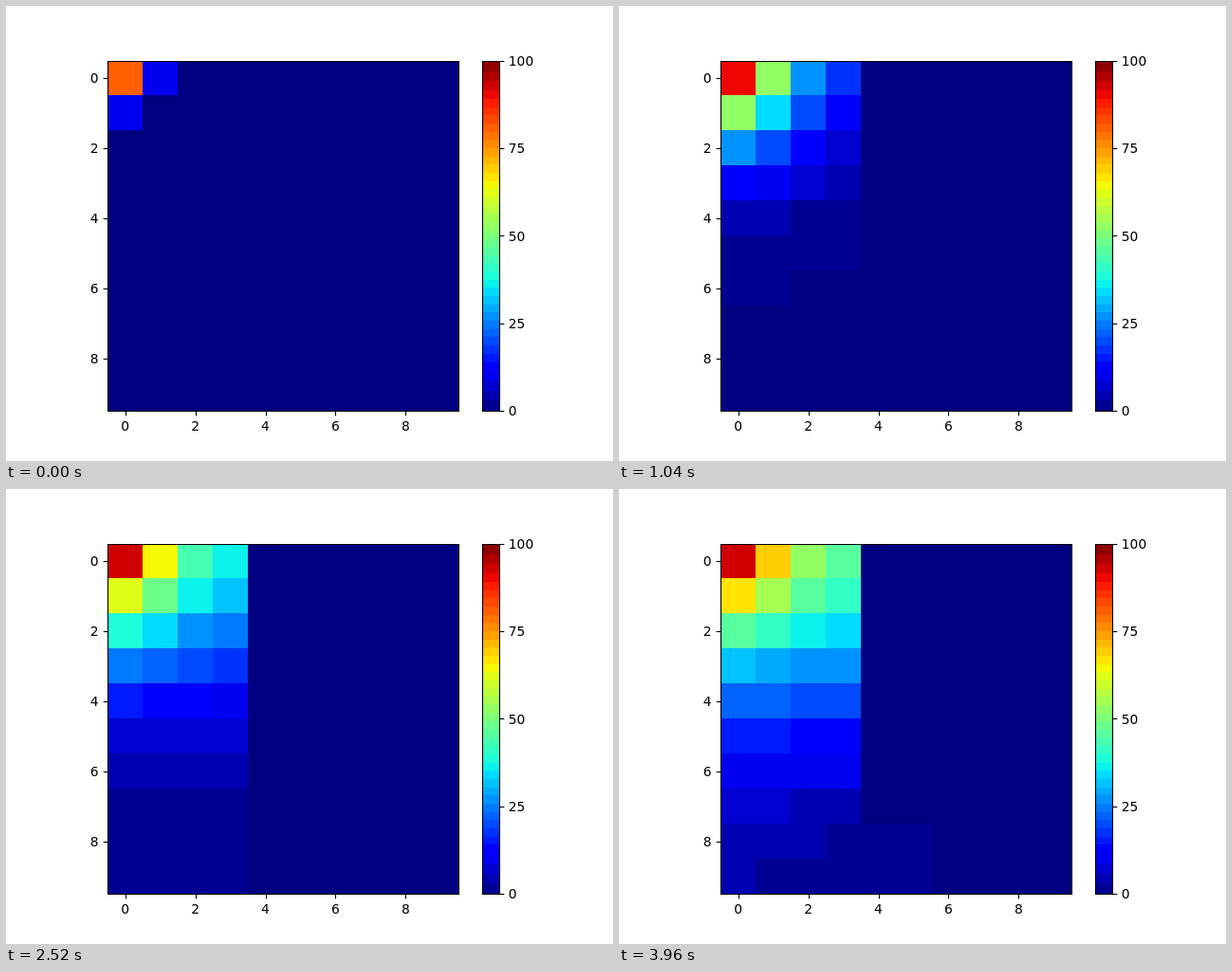
Write an HTML page that moves like this. It is 640 by 480 pixels and loops after 4000 ms.

```html
<!DOCTYPE html>
<html lang="en">
<head>
<meta charset="utf-8">
<title>Heat diffusion</title>
<style>
  html, body { margin: 0; width: 100%; height: 100%; overflow: hidden; background: #fff; }
  svg { display: block; width: 640px; height: 480px; }
  text { font: 13.89px "DejaVu Sans", sans-serif; fill: #000; }
  .line { fill: none; stroke: #000; stroke-width: 1.11; }
</style>
</head>
<body>
<svg id="stage" viewBox="0 0 640 480">
  <defs><clipPath id="plot"><rect x="107" y="58" width="370" height="370"/></clipPath></defs>
</svg>
<script>
const SIZE = 10, CELL = 37, STEP_MS = 40, STEPS = 100;
const RATE = 0.1, SOURCE = 100;
const WALL_COL = 4, WALL_ROWS = 8;
const BAR = { left: 502, right: 520, top: 57.6, bottom: 427.2 };

const stage = document.getElementById("stage");

function add(parent, tag, attrs, text) {
  const node = document.createElementNS("http://www.w3.org/2000/svg", tag);
  for (const key in attrs) node.setAttribute(key, attrs[key]);
  if (text !== undefined) node.textContent = text;
  parent.appendChild(node);
  return node;
}

const clamp = v => Math.max(0, Math.min(1, v));

// Jet colour map for v in 0..1
function jet(v) {
  const r = Math.min((v - 0.35) / 0.31, 1 - 0.5 * (v - 0.89) / 0.11);
  const g = Math.min((v - 0.125) / 0.25, (0.91 - v) / 0.27);
  const b = Math.min(0.5 + 0.5 * v / 0.11, (0.65 - v) / 0.31);
  return `rgb(${[r, g, b].map(c => Math.round(255 * clamp(c))).join(",")})`;
}

// The 256 levels are grouped into flat bands: wider at both ends, six levels in the middle.
const edges = [0, 1, 8, 15, 22, 29];
for (let level = 36; level <= 234; level += 6) edges.push(level);
edges.push(241, 248, 256);

const bands = edges.slice(0, -1).map((from, i) => {
  const to = edges[i + 1];
  return { from, to, color: jet((from + to - 1) / 2 / 255) };
});

function colorOf(value) {
  const level = Math.min(255, Math.floor(value * 2.56));
  return bands.find(band => level < band.to).color;
}

const isOpen = (row, col) =>
  row >= 0 && col >= 0 && row < SIZE && col < SIZE &&
  !(col === WALL_COL && row < WALL_ROWS);

// One explicit diffusion step; edges and wall are insulated.
function diffuse(grid) {
  const heat = grid.slice();
  heat[0] = SOURCE;
  return heat.map((value, i) => {
    const row = Math.floor(i / SIZE), col = i % SIZE;
    if (!isOpen(row, col)) return value;
    let flow = 0;
    for (const [dr, dc] of [[0, 1], [1, 0], [0, -1], [-1, 0]]) {
      if (isOpen(row + dr, col + dc)) flow += heat[(row + dr) * SIZE + col + dc] - value;
    }
    return value + RATE * flow;
  });
}

const history = [];
let grid = new Array(SIZE * SIZE).fill(0);
for (let i = 0; i < STEPS; i++) history.push(grid = diffuse(grid));
const colors = history.map(state => state.map(colorOf));

const heatmap = add(stage, "g", { "clip-path": "url(#plot)", "shape-rendering": "crispEdges" });
const cells = grid.map((_, i) => add(heatmap, "rect", {
  x: 107 + CELL * (i % SIZE), y: 57 + CELL * Math.floor(i / SIZE), width: CELL, height: CELL
}));

const bar = add(stage, "g", { "shape-rendering": "crispEdges" });
const barY = level => BAR.bottom - (BAR.bottom - BAR.top) * level / 256;
for (const { from, to, color } of bands) {
  add(bar, "rect", {
    x: BAR.left, y: barY(to), width: BAR.right - BAR.left, height: barY(from) - barY(to), fill: color
  });
}

const line = d => add(stage, "path", { d, class: "line" });
const label = (x, y, anchor, text) => add(stage, "text", { x, y, "text-anchor": anchor }, text);
const snap = v => Math.floor(v + 0.5) + 0.5;

line("M107.5 58.5H477.5V427.5H107.5Z");
line("M502.5 58.5H520.5V427.5H502.5Z");

for (let n = 0; n < SIZE; n += 2) {
  const x = 107.2 + 36.96 * (n + 0.5), y = 57.6 + 36.96 * (n + 0.5);
  line(`M${snap(x)} 427.5v4.86`);
  line(`M107.5 ${snap(y)}h-4.86`);
  label(x, 448, "middle", n);
  label(97.5, Math.round(y + 5.2), "end", n);
}
for (let n = 0; n <= 100; n += 25) {
  const y = barY(n * 2.56);
  line(`M520.5 ${snap(y)}h4.86`);
  label(529.8, Math.round(y + 5.2), "start", n);
}

function render(ms) {
  const state = colors[Math.floor(ms / STEP_MS) % STEPS];
  cells.forEach((cell, i) => cell.setAttribute("fill", state[i]));
}

const start = performance.now();
function tick() {
  render(performance.now() - start);
  requestAnimationFrame(tick);
}
render(0);
requestAnimationFrame(tick);
</script>
</body>
</html>
```
